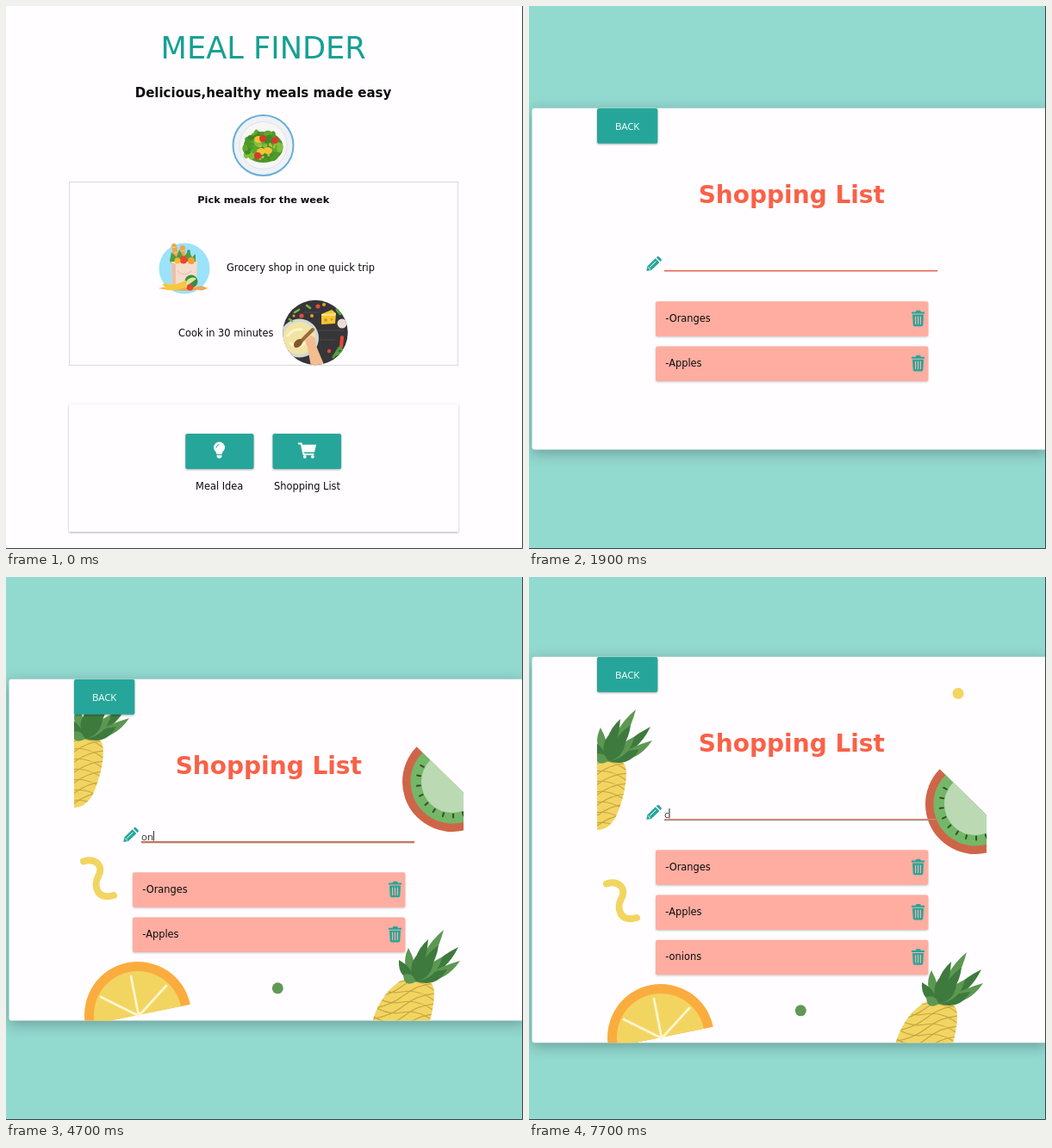
An HTML page for the animation above (8000 ms loop, 600 by 631 pixels).

```html
<!DOCTYPE html>
<html lang="en">
<head>
<meta charset="utf-8">
<title>Meal planner</title>
<style>
  html, body { margin: 0; width: 100%; height: 100%; overflow: hidden; background: #fffdff; }
  svg { display: block; width: 600px; height: 631px; }
  text { font: 11.4px "DejaVu Sans", Verdana, sans-serif; fill: #0b0b0b; }
  .mid { text-anchor: middle; }
  .bold { font-weight: bold; }
  .ui { font-family: "Open Sans", "Noto Sans", sans-serif; }
  .raised { filter: drop-shadow(0 1.3px 1.3px rgba(0,0,0,.32)); }
  .soft { filter: drop-shadow(0 1px 1px rgba(0,0,0,.22)); }
  .deep { filter: drop-shadow(0 4px 8px rgba(0,0,0,.27)); }
  .teal { fill: #26a69a; }
  .line { fill: none; stroke-linecap: round; stroke-linejoin: round; }
</style>
</head>
<body>
<svg viewBox="0 0 600 631" xmlns="http://www.w3.org/2000/svg">
  <defs>
    <clipPath id="cardClip"><rect id="clipBox" x="79" width="452"/></clipPath>
    <clipPath id="boardClip"><circle cx="359" cy="379.5" r="37.7"/></clipPath>
    <path id="fruitBody" d="M70 190C78 182 105 183 111 192C116 203 110 232 102 250C96 263 88 268 79 268C60 268 40 255 41 237C44 220 56 200 70 190Z"/>
    <clipPath id="bodyClip"><use href="#fruitBody"/></clipPath>
    <g id="pineapple">
      <use href="#fruitBody" fill="#f2d561"/>
      <g id="skin" class="line" clip-path="url(#bodyClip)" stroke="#c9a544" stroke-width="1.2"></g>
      <g id="crown"></g>
    </g>
    <g id="trash">
      <path class="teal" d="M444 355.5h4.5l1-1.7h4.5l1 1.7h4v2h-15zM445 358.6h13l-.7 12q-.1 1.7-1.8 1.7h-8q-1.700-.1-1.800-1.700z"/>
      <path class="line" d="M448.600 361v8.500M451.500 361v8.500M454.400 361v8.500" stroke="#ffada1" stroke-width="1.200"/>
    </g>
  </defs>

  <g id="home">
    <rect width="600" height="631" fill="#fffdff"/>
    <text class="mid" x="298.700" y="61" style="font-size:35.200px;fill:#16a093">MEAL FINDER</text>
    <text class="mid bold" x="298.500" y="106" style="font-size:15px">Delicious,healthy meals made easy</text>

    <circle cx="298.500" cy="162" r="35" fill="#eef1f5" stroke="#68aed6" stroke-width="2"/>
    <circle cx="298.500" cy="162" r="27.500" fill="#f8f6f5" stroke="#dfe4ea"/>
    <g id="salad"></g>

    <rect x="73.500" y="204.500" width="451" height="213" fill="none" stroke="#d9d9da"/>
    <text class="mid bold" x="298.800" y="229" style="font-size:11.350px">Pick meals for the week</text>

    <g id="groceries">
      <circle cx="207" cy="305" r="29.500" fill="#9be3fa"/>
      <path d="M176 328q30-6 60 0q-30 6-60 0" fill="#f3a75d"/>
      <path class="line" d="M199 298L195 279M204 297L205 281" stroke="#eda64f" stroke-width="6"/>
      <path class="line" d="M193 281l4-1M195 287l4-1M203 285l4-1" stroke="#f9d18b"/>
      <path class="line" d="M212 296V285" stroke="#4aa0a8" stroke-width="4"/>
      <path d="M190 296l2-10 6 6 3-9 5 9 6-8 4 8 4-4v12h-28z" fill="#4d9d42"/>
      <path d="M191.500 297h30.500l-1.500 30h-28z" fill="#f6dccd"/>
      <path d="M192 298l5 2v27h-4.500z" fill="#e8c1ac"/>
      <path class="line" d="M199 308q8 8 16 0" stroke="#e6bda8"/>
      <circle cx="206" cy="295" r="4.500" fill="#e9452f"/>
      <circle cx="199" cy="296" r="3.500" fill="#f9b934"/>
      <circle cx="215" cy="296" r="4" fill="#f6a02c"/>
      <circle cx="215" cy="320" r="7.500" fill="#3c8c3e"/>
      <path d="M209 326a8 8 0 0 1 12-9z" fill="#d9e8a0"/>
      <path class="line" d="M184 324q10 4 24-3M186 328q10 2 21-3" stroke="#f7c93b" stroke-width="3.600"/>
      <circle cx="213.500" cy="327" r="3.800" fill="#e9452f"/>
      <ellipse cx="226" cy="328" rx="6" ry="2.500" fill="#f0a656"/>
    </g>
    <text x="256" y="308">Grocery shop in one quick trip</text>
    <text x="200" y="383.500">Cook in 30 minutes</text>

    <g clip-path="url(#boardClip)">
      <rect x="321" y="341" width="77" height="77" fill="#363538"/>
      <path class="line" d="M362 377h30M364 388h18M345 356h18" stroke="#4b4a4d"/>
      <circle cx="340.500" cy="386" r="22.500" fill="#d4d8d6"/>
      <circle cx="340.500" cy="386" r="19" fill="#f1e4a4"/>
      <path class="line" d="M327 383q7-9 16-7M330 392q10 8 18-2" stroke="#fbf4ca" stroke-width="3"/>
      <path class="line" d="M338 394L356 376" stroke="#9a6a3c" stroke-width="4"/>
      <ellipse cx="339" cy="392" rx="6" ry="4" transform="rotate(-45 339 392)" fill="#85572f"/>
      <path d="M347 389l7-6 5 3 1 9 10 24h-16l-4-22z" fill="#f3bd92"/>
      <path d="M366 358l12-5 5 4-1 12-16 1z" fill="#f6c733"/>
      <path d="M366 358l17-1-1 3h-16z" fill="#fbe085"/>
      <g fill="#d79b20"><circle cx="371" cy="365" r="2"/><circle cx="378" cy="364" r="1.500"/></g>
      <circle cx="390" cy="369" r="5.500" fill="#eadfd6"/>
      <path class="line" d="M390 385l-1 11" stroke="#e24a37" stroke-width="4"/>
      <path class="line" d="M380 408l7-11M383 405l7-3M389 399l5 5M384 353l4 5" stroke="#51a33f" stroke-width="3"/>
      <path class="line" d="M335 356l5-3M349 348l4 3M329 364l3 2" stroke="#7db04d" stroke-width="2.500"/>
      <g fill="#e24a37"><circle cx="343" cy="360" r="2.600"/><circle cx="362" cy="349" r="2.600"/><circle cx="375" cy="401" r="2.200"/></g>
      <g fill="#e9a22f"><circle cx="355" cy="360" r="2"/><circle cx="369" cy="347" r="2"/><circle cx="334" cy="360" r="1.500"/></g>
    </g>

    <rect class="raised" x="73" y="462.500" width="452" height="148.500" rx="1" fill="#fffdff"/>
    <rect class="raised teal" x="208.300" y="497" width="79.200" height="41" rx="2"/>
    <rect id="listButton" class="raised" x="309.500" y="497" width="79.500" height="41" rx="2"/>
    <g fill="#fff">
      <path d="M244.500 521c0-3-3.500-4.500-3.500-8a6.500 6.500 0 0 1 13 0c0 3.500-3.500 5-3.500 8zM244.600 522h5.800v1.800l-1.400 1.700h-3l-1.400-1.700z"/>
      <path d="M339 507.500h4.500l.6 2.300h15.900l-2 8.700h-12l.3 1.600h11v1.900h-12.700l-2.700-12.500h-2.900z"/>
      <circle cx="346.800" cy="523.800" r="1.900"/><circle cx="355.800" cy="523.800" r="1.900"/>
    </g>
    <path class="line" d="M244 513q.4-3 3-3.400" stroke="#26a69a"/>
    <text class="mid" x="247.700" y="561.500">Meal Idea</text>
    <text class="mid" x="349.500" y="561.500">Shopping List</text>
  </g>

  <g id="shopping">
    <rect width="600" height="631" fill="#92d9d0"/>
    <rect id="card" class="deep" x="3.500" width="598" rx="3" fill="#fffdff"/>
    <g clip-path="url(#cardClip)">
      <g id="fruit">
        <use href="#pineapple"/>
        <use href="#pineapple" x="384" y="282"/>
        <g id="kiwi" transform="translate(518 238) rotate(44.500)">
          <path d="M-58 0A58 58 0 0 0 58 0z" fill="#cf6548"/>
          <path d="M-48.500 0A48.500 48.500 0 0 0 48.500 0z" fill="#74b768"/>
          <path d="M-36 0A36 36 0 0 0 36 0z" fill="#bbdab4"/>
        </g>
        <g transform="translate(153 509) rotate(-11.500)">
          <path d="M-62 0A62 62 0 0 1 62 0z" fill="#fbac3e"/>
          <path d="M-51 0A51 51 0 0 1 51 0z" fill="#f2d561"/>
        </g>
        <path class="line" d="M154 510L145 464M154 510L186 475M154 510L110 488" stroke="#fff6cf" stroke-width="2.700"/>
        <path class="line" d="M90 330.500C104 326 114 336 107 348C101 359 106 376 125 370" stroke="#f2d561" stroke-width="8"/>
        <circle cx="315.300" cy="477.800" r="6.500" fill="#609856"/>
        <circle cx="498" cy="109.300" r="6.500" fill="#f2d561"/>
      </g>
    </g>
    <g id="content">
      <rect class="raised teal" x="79" y="119" width="70.300" height="40.700" rx="2"/>
      <text class="mid ui" x="114.200" y="144" style="fill:#fff">BACK</text>
      <text class="mid bold" x="304.800" y="229" style="font-size:28px;fill:#fa6147">Shopping List</text>
      <path class="teal" d="M136.300 308l1-5.500 9.400-9.200 4.700 4.600-9.500 9.200zM147.700 292.300l1.100-1q1-.8 2 0l2.700 2.600q.9 1 0 2l-1.100 1.100z"/>
      <path class="line" d="M140.500 303.300l6.500-6.300M138.300 303.800l2.500 2.400" stroke="#fff" stroke-width="1"/>
      <rect id="underTop" x="157" width="317"/>
      <rect id="underLow" x="157" width="317"/>
      <text id="typed" class="ui" x="157" y="306" style="fill:#333"></text>
      <rect id="caret" y="295" width="1" height="11.500" fill="#222"/>
      <g id="items"></g>
    </g>
  </g>
  <path d="M599.500 0V630.500H0" fill="none" stroke="#3c4443"/>
</svg>

<script>
const LOOP = 8000;
const $ = id => document.getElementById(id);
const set = (id, attrs) => {
  for (const [name, value] of Object.entries(attrs)) $(id).setAttribute(name, value);
};
const show = (id, on) => set(id, { visibility: on ? "inherit" : "hidden" });

function seeded(seed) {
  return () => (seed = seed * 16807 % 2147483647) / 2147483647;
}

function drawSalad() {
  const rnd = seeded(77);
  const blob = (fill, size, reach) => {
    const angle = rnd() * 2 * Math.PI, dist = Math.sqrt(rnd()) * reach;
    const x = 298.5 + 1.22 * dist * Math.cos(angle), y = 163 + dist * Math.sin(angle);
    return `<ellipse cx="${x}" cy="${y}" rx="${size}" ry="${size * .65}" fill="${fill}" transform="rotate(${rnd() * 180} ${x} ${y})"/>`;
  };
  const greens = ["#5fa62c", "#3f8a26", "#83bf3c", "#4c9a2a"];
  let out = `<ellipse cx="298.500" cy="164" rx="23" ry="18" fill="#4c962b"/>`;
  for (let i = 0; i < 46; i++) out += blob(greens[i % 4], 3 + rnd() * 3, 18);
  for (let i = 0; i < 7; i++) out += blob("#c9b84a", 2, 15);
  for (const [x, y] of [[293, 155], [304, 168], [296, 169]])
    out += `<ellipse cx="${x}" cy="${y}" rx="5" ry="4" fill="#f3c136"/>`;
  for (const [x, y] of [[298, 154], [312, 156], [292, 174]])
    out += `<circle cx="${x}" cy="${y}" r="4" fill="#d83a2c"/>`;
  $("salad").innerHTML = out;
}

function drawPineapple() {
  let skin = "";
  for (let i = 0; i < 9; i++) {
    const y = 172 + i * 12;
    skin += `<path d="M36 ${y - 8}q20 16 40 12t42 14"/><path d="M36 ${y + 24}q24-2 42-16t40-14"/>`;
  }
  $("skin").innerHTML = skin;

  const leaf = ([x, y, bend, fill]) => {
    const bx = 92, by = 188, dx = x - bx, dy = y - by, len = Math.hypot(dx, dy);
    const side = w => `${bx + dx * .5 - dy / len * w} ${by + dy * .5 + dx / len * w}`;
    return `<path d="M${bx} ${by}Q${side(bend + 11)} ${x} ${y}Q${side(bend - 11)} ${bx} ${by}" fill="${fill}"/>`;
  };
  const dark = "#3e7a3d", light = "#5c9852";
  $("crown").innerHTML = [
    [124, 128, -3, light], [106, 139, -5, dark], [83, 149, -5, light], [72, 163, -4, dark],
    [141, 148, 4, dark], [143, 164, 6, light], [128, 174, 5, dark], [77, 180, -3, light],
    [118, 146, 0, dark], [122, 160, 3, light], [94, 156, -2, dark], [112, 165, 0, dark]
  ].map(leaf).join("");
}

function drawSeeds() {
  let seeds = "";
  for (let a = 10; a < 180; a += 17)
    seeds += `<path class="line" d="M37.500 0h4" transform="rotate(${a})" stroke="#3b4a2b" stroke-width="2"/>`;
  $("kiwi").insertAdjacentHTML("beforeend", seeds);
}

function drawItems() {
  $("items").innerHTML = ["Oranges", "Apples", "onions"].map((name, i) => `
    <g id="item${i}" transform="translate(0 ${i * 52.2})">
      <rect class="soft" x="147" y="343.300" width="316.300" height="40.500" rx="2" fill="#ffada1"/>
      <text x="158.300" y="366.700">-${name}</text>
      <use href="#trash"/>
    </g>`).join("");
}

const keys = [[4400, "o"], [4700, "on"], [4900, "oni"], [5100, "onio"], [5400, "onion"], [5700, "onions"], [6200, ""], [7700, "c"]];
const typedAt = t => keys.reduce((text, [at, value]) => t >= at ? value : text, "");
const caretAt = t => (t >= 3500 && t < 4000) || (t >= 4400 && t < 6200) || (t >= 6700 && t < 7300) || t >= 7700;

const mix = (a, b, p) => `rgb(${a.map((v, i) => Math.round(v + (b[i] - v) * p))})`;
const stepped = (t, start, steps) =>
  Math.max(0, Math.min(1, (Math.floor((t - start) / 100) + 1) / steps));

function render(t) {
  const listOpen = t >= 1900, added = t >= 6200;
  show("home", !listOpen);
  show("shopping", listOpen);
  set("listButton", { fill: mix([38, 166, 154], [43, 187, 173], stepped(t, 900, 4)) });

  const top = added ? 92.8 : 118.8, height = added ? 448.5 : 396.700;
  set("card", { y: top, height });
  set("clipBox", { y: top, height });
  set("content", { transform: `translate(0 ${added ? -26 : 0})` });
  set("fruit", { transform: `translate(0 ${added ? 26 : 0})` });
  show("fruit", listOpen && t >= 2100);
  show("item2", listOpen && added);

  const focus = stepped(t, 3600, 2);
  set("underTop", { y: 307, height: 1.5, fill: added ? "#f4796c" : mix([232, 98, 78], [205, 104, 80], focus) });
  set("underLow", { y: 308.3, height: added ? .9 : focus, fill: added ? "#7d8a7c" : "#a9745f" });

  const text = typedAt(t);
  $("typed").textContent = text;
  set("caret", { x: 157 + (text ? $("typed").getComputedTextLength() : 0) });
  show("caret", listOpen && caretAt(t));
}

drawSalad();
drawPineapple();
drawSeeds();
drawItems();

const start = performance.now();
function tick() {
  render((performance.now() - start) % LOOP);
  requestAnimationFrame(tick);
}
render(0);
requestAnimationFrame(tick);
</script>
</body>
</html>
```
